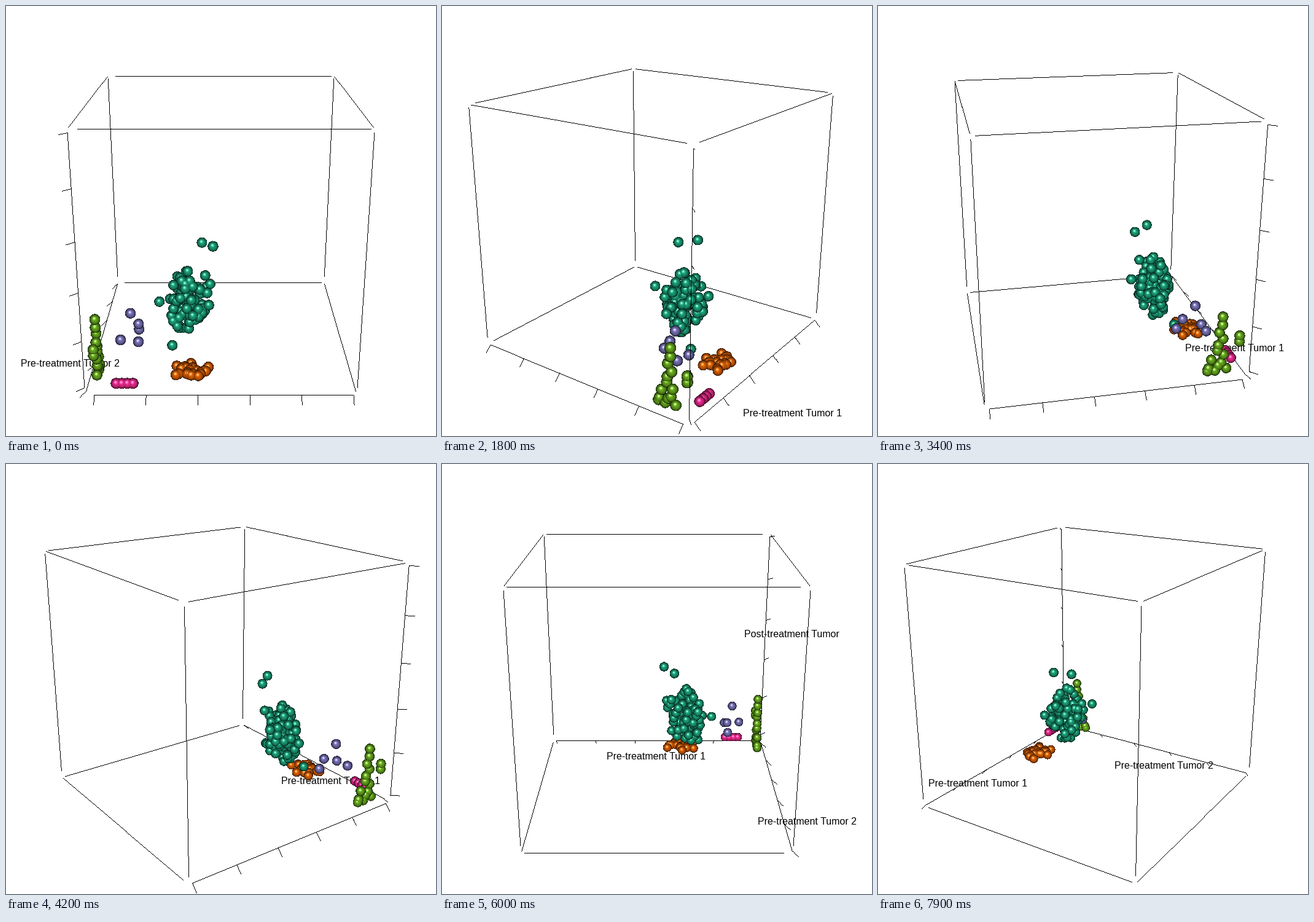
Animation of 700 by 700 pixels, one loop 8 s. Source, as a matplotlib script:

```python
import itertools

import matplotlib.pyplot as plt
import numpy as np
from matplotlib.animation import FuncAnimation

SIZE, FRAMES, STEP = 700, 80, 3.0           # pixels, frames, degrees per frame
FOCAL = SIZE / 2 / np.tan(np.radians(15))   # 30 degree field of view
DIST, DEPTH = 6.5, 1.685                    # camera distance, half view depth
SIN, COS = np.sin(np.radians(20)), np.cos(np.radians(20))
RADIUS = 0.0405
LIMITS = [(-0.932, 0.976), (-0.95, 0.97), (-0.938, 0.975)]
FLOOR = -0.936

TEAL, ORANGE, PURPLE = (27, 158, 119), (217, 95, 2), (117, 112, 179)
PINK, GREEN = (231, 41, 138), (102, 166, 30)

rng = np.random.default_rng(7)


def blob(n, center, radii, lean=(0, 0)):
    """Random points filling an ellipsoid that leans with height."""
    p = rng.normal(size=(n, 3))
    p *= (rng.random(n) ** 0.36 / np.linalg.norm(p, axis=1))[:, None]
    p *= radii
    p[:, :2] += np.outer(p[:, 2], lean)
    return p + center


def green_stack(n=14):
    """A heap on the x = 0 wall, wide at the floor and thin at the top."""
    i = np.arange(n)
    u = i / (n - 1)
    y = -0.75 - 0.04 * u + 0.1 * (1 - u) * np.sin(2.4 * i)
    return np.column_stack([np.full(n, LIMITS[0][0]), y, FLOOR + 0.45 * u ** 2])


teal = np.vstack([
    blob(84, (-0.235, -0.44, -0.5), (0.165, 0.15, 0.29), (0.06, 0.15)),
    [(-.148, -.313, -.064), (-.061, -.436, -.046), (-.481, -.437, -.511),
     (-.349, -.236, -.385), (-.093, -.566, -.478), (-.377, -.595, -.808)]])
orange = blob(22, (-0.235, -0.74, FLOOR), (0.155, 0.13, 0))
purple = np.array([(-.683, -.659, -.501), (-.757, -.729, -.688),
                   (-.634, -.579, -.631), (-.622, -.739, -.699),
                   (-.637, -.528, -.705)])
pink = np.array([(x, -0.94, FLOOR) for x in np.linspace(-0.776, -0.651, 4)])
green = np.vstack([green_stack(), [(-.932, -.933, -.659), (-.932, -.934, -.707)]])

CLOUDS = [(TEAL, teal), (ORANGE, orange), (PURPLE, purple), (PINK, pink), (GREEN, green)]
POINTS = np.vstack([cloud for _, cloud in CLOUDS])
COLORS = np.vstack([np.tile(c, (len(cloud), 1)) for c, cloud in CLOUDS]).astype(float)

LABELS = [("Pre-treatment Tumor 1", (0, -1.3, -1.3)),
          ("Pre-treatment Tumor 2", (-1.3, 0, -1.3)),
          ("Post-treatment Tumor", (-1.3, -1.3, 0))]


def on_axis(axis, value, u, v):
    p = [u, v]
    p.insert(axis, value)
    return p


def build_lines():
    lines = []
    for axis, (lo, hi) in enumerate(LIMITS):
        for u, v in itertools.product((-1, 1), repeat=2):
            lines.append((on_axis(axis, lo, u, v), on_axis(axis, hi, u, v)))
        for t in np.linspace(lo, hi, 6):
            lines.append((on_axis(axis, t, -1, -1), on_axis(axis, t, -1.05, -1.05)))
    return np.array(lines)


LINES = build_lines()


def project(points, angle):
    """Spin about the vertical axis; return screen x, screen y and distance."""
    x, y, z = np.moveaxis(np.asarray(points, float), -1, 0)
    c, s = np.cos(angle), np.sin(angle)
    x, y = x * c - y * s, x * s + y * c
    d = DIST + y * COS - z * SIN
    return (SIZE / 2 + FOCAL * x / d,
            SIZE / 2 - FOCAL * (z * COS + y * SIN) / d, d)


def in_depth(d):
    return np.abs(d - DIST) < DEPTH


def draw_sphere(rgb, depth, x, y, d, color):
    r = FOCAL * RADIUS / d
    x0, x1 = max(int(x - r), 0), min(int(x + r) + 2, SIZE)
    y0, y1 = max(int(y - r), 0), min(int(y + r) + 2, SIZE)
    ny, nx = np.mgrid[y0:y1, x0:x1] + 0.5
    nx, ny = (nx - x) / r, (y - ny) / r
    sq = nx ** 2 + ny ** 2
    nz = np.sqrt(np.clip(1 - sq, 0, 1))
    near = d - RADIUS * nz
    box = np.s_[y0:y1, x0:x1]
    hit = (sq <= 1) & (near < depth[box])
    shine = np.clip(-0.12 * nx + 0.2 * ny + 0.972 * nz, 0, 1) ** 32
    shade = color * nz[..., None] + 125 * shine[..., None]
    rgb[box][hit] = np.clip(shade, 0, 255)[hit]
    depth[box][hit] = near[hit]


def draw_line(rgb, depth, xs, ys, ds):
    n = int(max(abs(xs[1] - xs[0]), abs(ys[1] - ys[0]))) + 2
    t = np.linspace(0, 1, n)
    x = np.floor(xs[0] + (xs[1] - xs[0]) * t).astype(int)
    y = np.floor(ys[0] + (ys[1] - ys[0]) * t).astype(int)
    d = 1 / ((1 - t) / ds[0] + t / ds[1])
    ok = (x >= 0) & (x < SIZE) & (y >= 0) & (y < SIZE) & in_depth(d)
    x, y, d = x[ok], y[ok], d[ok]
    ok = d < depth[y, x]
    rgb[y[ok], x[ok]] = 0
    depth[y[ok], x[ok]] = d[ok]


def render(angle):
    rgb = np.full((SIZE, SIZE, 3), 255, np.uint8)
    depth = np.full((SIZE, SIZE), np.inf)
    for x, y, d, color in zip(*project(POINTS, angle), COLORS):
        draw_sphere(rgb, depth, x, y, d, color)
    for xs, ys, ds in zip(*project(LINES, angle)):
        draw_line(rgb, depth, xs, ys, ds)
    return rgb, depth


def layer(rgb, mask):
    return np.dstack([rgb, np.where(mask, 255, 0).astype(np.uint8)])


plt.rcParams["font.family"] = "Liberation Sans"
fig = plt.figure(figsize=(7, 7), dpi=100, facecolor="white")
blank = np.zeros((SIZE, SIZE, 4), np.uint8)
scene = fig.figimage(blank, origin="upper", zorder=0)
texts = [fig.text(0, 0, s, transform=None, fontsize=11.52, ha="center",
                  va="baseline", color="black") for s, _ in LABELS]
covers = [fig.figimage(blank, origin="upper") for _ in LABELS]
HALF_WIDTH = 80


def draw(i):
    angle = np.radians(STEP * i)
    rgb, depth = render(angle)
    scene.set_data(layer(rgb, depth < np.inf))
    spots = zip(*project([p for _, p in LABELS], angle))
    for text, cover, (x, y, d) in zip(texts, covers, spots):
        base = y + 7
        shown = bool(in_depth(d) and HALF_WIDTH <= x < SIZE and base < SIZE)
        text.set_visible(shown)
        cover.set_visible(shown)
        if shown:
            text.set_position((round(x - 1), SIZE - round(base)))
            # Nearer labels go later; whatever stands before a label covers it.
            text.set_zorder(100 - 10 * d)
            cover.set_zorder(100 - 10 * d + 0.001)
            cover.set_data(layer(rgb, depth < d))
    return [scene, *texts, *covers]


anim = FuncAnimation(fig, draw, frames=FRAMES, interval=100, repeat=True,
                     repeat_delay=0, init_func=lambda: draw(0))
plt.show()
```
